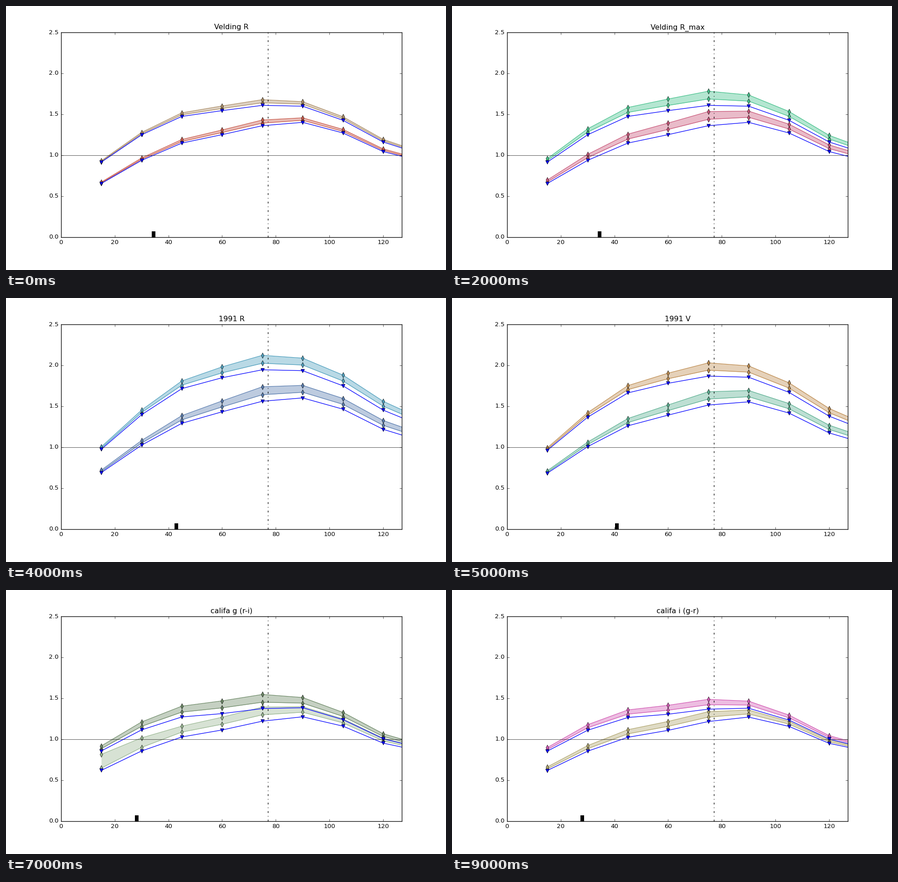
These frames come from a looping animation (966 px wide and 580 px high, 10 s). A matplotlib script:

```python
import numpy as np
import matplotlib.pyplot as plt
from matplotlib.animation import FuncAnimation

plt.style.use("classic")
plt.rcParams.update({
    "font.family": "DejaVu Sans",
    "font.size": 10,
    "axes.titlesize": 12,
    "figure.facecolor": "w",
    "savefig.facecolor": "w",
    "savefig.dpi": "figure",
})

W, H, DPI = 966, 580, 96
RADII = np.arange(15, 136, 15)

# Shared by all models: weight of the stellar disc and the gas contribution
WEIGHT = np.array([.404, .747, 1.206, 1.68, 2.2, 2.7, 3.28, 3.82, 4.25])
GAS = np.array([.267, .474, .665, .816, .992, 1.109, 1.042, .871, .795])

# Band height relative to the disc: grows up to radius 75, then stays
SPREAD = .18 * np.exp(np.minimum(RADII, 75) / 41)

# title, disc scale length, band strength, extra height of the lower band
# at the first radii, upper and lower colours
MODELS = [
    ("Velding R", 34.4, .25, (), "#ac8e68", "#c85a4b"),
    ("Velding B", 34.4, .43, (), "#7fa65a", "#8f6fc0"),
    ("Velding R_max", 34.4, .62, (), "#45c18c", "#c85578"),
    ("Varnez-Olivo J", 14.1, 1.4, (.123,), "#afd75f", "#6eebaf"),
    ("1991 R", 43.0, .41, (), "#50a0be", "#5a7daf"),
    ("1991 V", 41.0, .41, (), "#be8c50", "#5aaf91"),
    ("Marudenko V", 18.1, 1.1, (.095,), "#468cc8", "#d7d782"),
    ("califa g (r-i)", 28.2, 1, (.134, .064), "#6e8a68", "#9bb894"),
    ("califa r (g-i)", 28.1, .85, (.04,), "#7d78c3", "#c89b5f"),
    ("califa i (g-r)", 28.0, .71, (), "#d25ab4", "#afa56e"),
]

fig = plt.figure(figsize=(W / DPI, H / DPI), dpi=DPI)
ax = fig.add_axes([.125, .125, .775, .775])


def draw_band(low, high, color):
    ax.fill_between(RADII, low, high, color=color, alpha=.4, linewidth=0)
    for edge in (low, high):
        ax.plot(RADII, edge, "d-", color=color)


def draw(i):
    title, length, strength, lift, *colors = MODELS[i]
    disc = WEIGHT * np.exp(-RADII / length)
    curves = [GAS + 2.48 * disc, GAS + 1.48 * disc]
    rise = strength * SPREAD * disc
    extra = np.zeros(len(RADII))
    extra[:len(lift)] = lift

    ax.clear()
    for curve, color, bump in zip(curves, colors, (0, extra)):
        draw_band(curve + .45 * rise, curve + rise + bump, color)
    for curve in curves:
        ax.plot(RADII, curve, "v-", color="b")
    ax.axhline(1, color="k", lw=.5)
    ax.axvline(77, color="k", ls="-.")
    ax.axvline(length, ymax=.02, color="k", lw=6,
               solid_capstyle="projecting")
    ax.set(xlim=(0, 127), ylim=(0, 2.5), title=title,
           xticks=range(0, 121, 20), yticks=np.arange(0, 2.6, .5))
    return []


anim = FuncAnimation(fig, draw, frames=len(MODELS), interval=1000,
                     repeat=True, repeat_delay=0)
plt.show()
```
